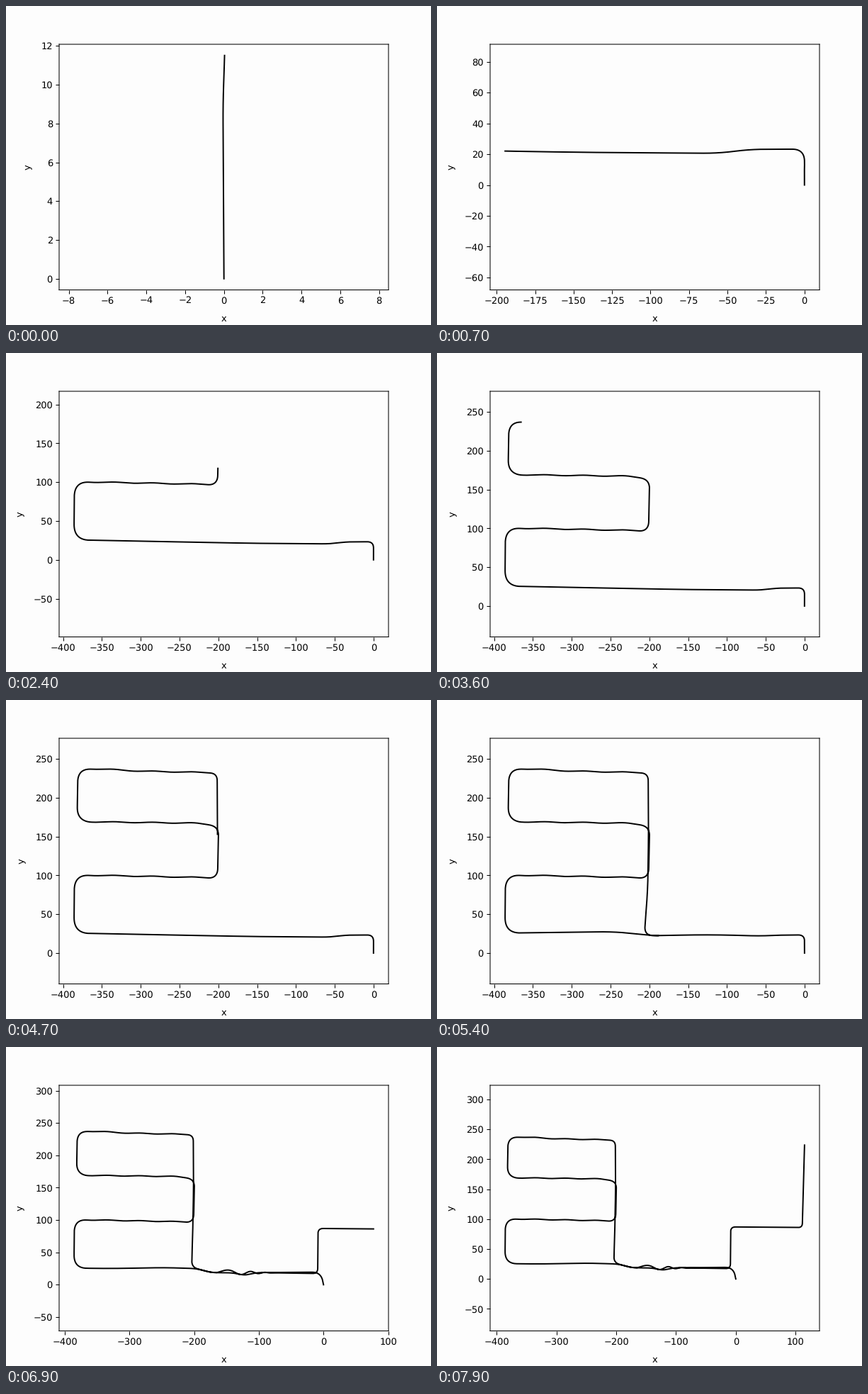
Write a matplotlib script that moves like this. It is 600 px wide and 450 px high and loops after 8 s.

```python
import numpy as np
import matplotlib.pyplot as plt
from matplotlib.animation import FuncAnimation

FRAMES, INTERVAL = 80, 100
PAPER = "#fdfdfd"
STEP = 0.5        # spacing of path samples
TURN_COST = 12    # a radian of turning takes as long as this much straight road
CLOSE, RELAX = 53, 55   # steps at which the map is corrected

# Corners as (x, y, rounding)
OUT_RAW = [(0, 0, 0), (-.05, 9, 1), (.05, 12, 1), (0, 23.3, 8), (-35, 23.2, 10),
           (-56, 20.6, 10), (-150, 21.2, 40)]
OUT_CLOSED = [(0, 0, 0), (0, 23.4, 8), (-30, 23.2, 10), (-57, 22, 15),
              (-125, 24, 40), (-192, 22.3, 10), (-245, 27.6, 20)]
OUT_FINAL = [(0, 0, 0), (-4, 19.5, 14), (-85, 19, 20), (-160, 18.5, 7),
             (-175, 19, 8), (-197, 25, 10), (-245, 26.5, 20), (-327, 25, 30)]
LOOPS = [(-386, 25.7, 20), (-385.5, 100.7, 20), (-201, 97, 12),
         (-199.5, 164, 13), (-225, 167.3, 12), (-382, 169.3, 18),
         (-381, 237.6, 18), (-345, 237, 15), (-308, 234.5, 20),
         (-201.5, 232.3, 10), (-201, 156, 20)]
BACK_CLOSED = [(-202, 84, 20), (-206.5, 22.5, 12), (-160, 22.3, 0)]
BACK_FINAL = [(-202, 95, 20), (-204, 27, 10), (-173, 18.8, 8), (-87, 18.5, 10),
              (-9, 17.3, 8), (-8.5, 87, 8), (111.2, 86, 7), (115, 223.8, 0)]

# Where the drive is at a few steps: (step, x, y)
STOPS = [(0, 0, 11.75), (13, -380, 28.8), (24, -200.4, 118), (36, -365.5, 236.6),
         (54, -188.5, 22.3), (63, 2, 86.8), (69, 77.5, 86.3), (79, 115, 223.8)]


def arc(xy):
    return np.r_[0, np.cumsum(np.hypot(*np.diff(xy, axis=0).T))]


def rounded(corners):
    """Polyline with each corner replaced by a quadratic curve."""
    c = np.array(corners, float)
    p, cut = c[:, :2], c[:, 2]
    t = np.linspace(0, 1, 20)[:, None]
    parts = [p[:1]]
    for a, b, d, r in zip(p, p[1:], p[2:], cut[1:]):
        start = b + r * (a - b) / np.hypot(*(a - b))
        end = b + r * (d - b) / np.hypot(*(d - b))
        parts.append((1 - t)**2 * start + 2*t*(1 - t) * b + t**2 * end)
    xy = np.vstack(parts + [p[-1:]])
    s = arc(xy)
    at = np.linspace(0, s[-1], int(s[-1] / STEP))
    return np.column_stack([np.interp(at, s, xy[:, k]) for k in (0, 1)])


def ripple(xy):
    """Gentle waviness of the long upper roads."""
    x, y = xy.T
    wave = 0.5 * np.cos(2 * np.pi * (x + 284) / 50)
    return np.column_stack([x, y + wave * ((x < -190) & (y > 60))])


def slip(xy):
    """Drift on the road driven twice: a dip going out, a chirp coming back."""
    x, y = xy.T
    u = np.clip(x + 165, 0, 88)
    chirp = 5 * (1 - u / 88) * np.sin(np.pi * (.0185 * u + .00055 * u**2))
    dip = -3.5 * np.exp(-((x + 122) / 14)**2)
    back = np.arange(len(x)) > len(x) / 2
    return np.column_stack([x, y + np.where(back, chirp, dip) * (y < 30)])


def build(out, back):
    """Path, its time cost at each sample, and the cost at every stop."""
    xy = ripple(rounded(out + LOOPS + back))
    if back is BACK_FINAL:
        xy = slip(xy)
    heading = np.unwrap(np.arctan2(*np.diff(xy, axis=0).T[::-1]))
    turn = np.r_[0, 0, np.cumsum(np.abs(np.diff(heading)))]
    cost = arc(xy) + TURN_COST * turn
    marks, i = [], 0
    for _, x, y in STOPS:
        i += np.argmin(np.hypot(xy[i:, 0] - x, xy[i:, 1] - y))
        marks.append(cost[i])
    return xy, cost, marks


RAW = build(OUT_RAW, BACK_CLOSED)
CLOSED = build(OUT_CLOSED, BACK_CLOSED)
FINAL = build(OUT_FINAL, BACK_FINAL)


def trail(i):
    xy, cost, marks = RAW if i < CLOSE else CLOSED if i < RELAX else FINAL
    now = np.interp(i, [stop[0] for stop in STOPS], marks)
    tip = [np.interp(now, cost, xy[:, k]) for k in (0, 1)]
    return np.vstack([xy[cost < now], tip])


plt.rcParams.update({"path.snap": False, "text.hinting": "none"})
fig = plt.figure(figsize=(6.4, 4.8), dpi=93.75, facecolor=PAPER)
ax = fig.add_subplot(facecolor=PAPER)


def update(i):
    ax.cla()
    ax.plot(*trail(i).T, color="black", lw=1.5)
    ax.set_xlabel("x", labelpad=10)
    ax.set_ylabel("y", labelpad=10)
    ax.axis("equal")
    return ax.lines


anim = FuncAnimation(fig, update, frames=FRAMES, interval=INTERVAL,
                     init_func=lambda: [], repeat=True, repeat_delay=0)
plt.show()
```
